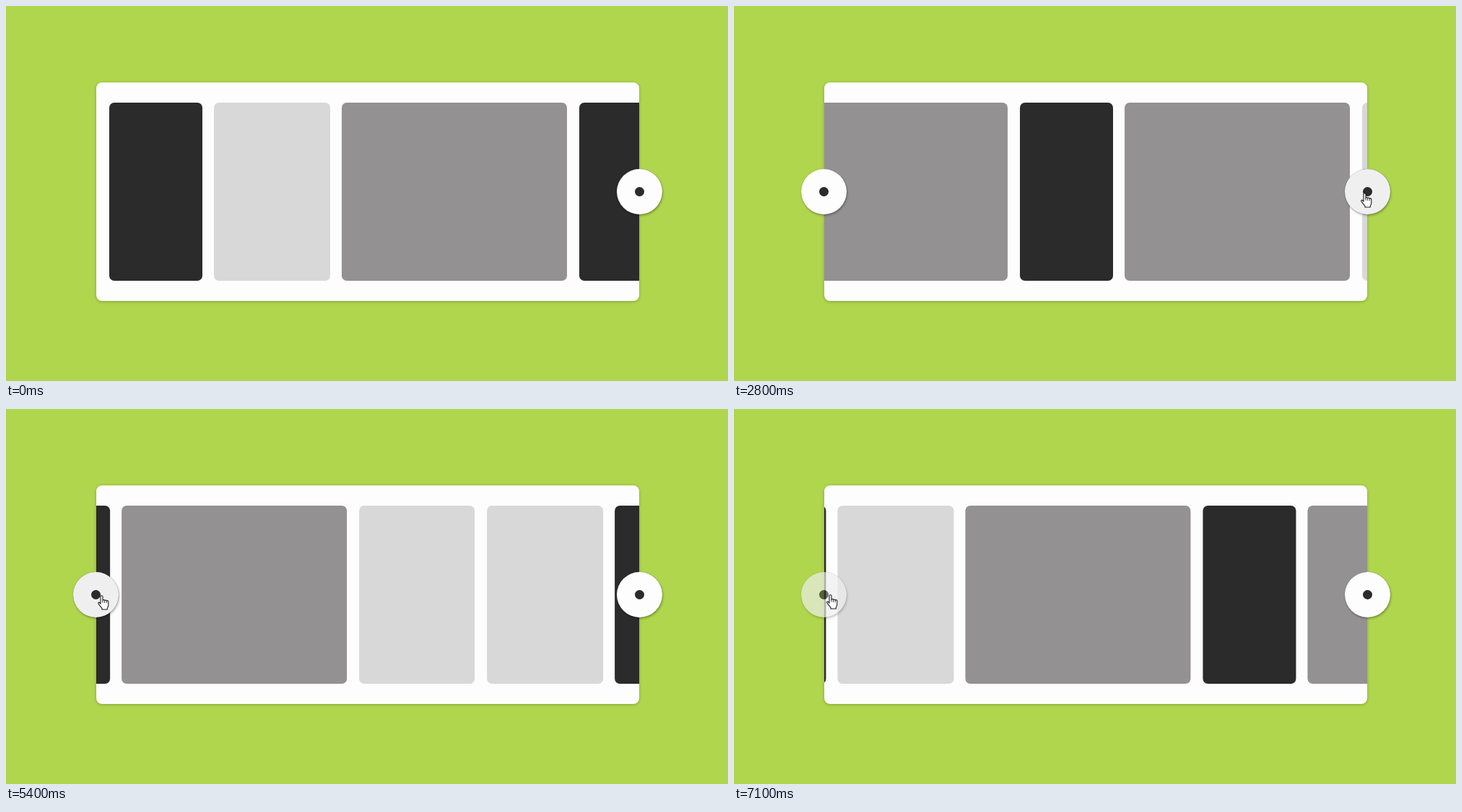
An HTML page for the animation above (7.2 s loop, 1000 by 520 pixels).

```html
<!DOCTYPE html>
<html lang="en">
<head>
<meta charset="utf-8">
<title>Scrolling panel</title>
<style>
  html, body { margin: 0; width: 100%; height: 100%; overflow: hidden; background: #afd64c; }
  .stage { position: relative; width: 1000px; height: 520px; overflow: hidden; }
  .card {
    position: absolute; left: 124.5px; top: 106px; width: 752.5px; height: 303px;
    border-radius: 8px; background: #fefdfe; overflow: hidden;
    box-shadow: 0 1px 4px rgba(0, 0, 0, .24);
  }
  .track { position: absolute; left: 0; top: 28px; height: 247px; }
  .tile { position: absolute; top: 0; height: 247px; border-radius: 7px; }
  .paddle {
    position: absolute; top: 226px; width: 63px; height: 63px; border-radius: 50%;
    box-shadow: 0 0 1px rgba(0, 0, 0, .45), 1px 2px 3px rgba(0, 0, 0, .28);
  }
  .paddle::after {
    content: ""; position: absolute; left: 25px; top: 24.5px;
    width: 13px; height: 13px; border-radius: 50%; background: #2b2b2b;
  }
  #left { left: 93px; }
  #right { left: 845.5px; }
  #hand { position: absolute; left: 0; top: 0; overflow: visible; }
</style>
</head>
<body>
<div class="stage">
  <div class="card"><div class="track" id="track"></div></div>
  <div class="paddle" id="left"></div>
  <div class="paddle" id="right"></div>
  <svg id="hand" width="16" height="21" viewBox="0 0 16 21">
    <path d="M4 2.2a1.5 1.5 0 0 1 3 0V7.2a1.4 1.4 0 0 1 2.6.5 1.4 1.4 0 0 1 2.6.7 1.4 1.4 0 0 1 2.6 1V14
             c0 2-1.3 3.4-1.6 4.6V20H6v-1.4C4.8 16.6 2.4 14.6.9 11.8c-.6-1.6 1-2.2 2-.9L4 12.2Z"
          fill="#fff" stroke="#1c1c1c" stroke-width="1.1" stroke-linejoin="round"/>
    <path d="M7 7v3.6M9.6 8v2.8M12.2 9v2.2" fill="none" stroke="#1c1c1c" stroke-width=".9"/>
  </svg>
</div>
<script>
const LOOP = 7200, TICK = 100, MOVE = 450, GAP = 16.5;
const KINDS = {
  dark: [128.5, '#2b2b2b'],
  light: [160.7, '#d8d8d8'],
  grey: [312.3, '#939192']
};
const ORDER = ['dark', 'light', 'grey', 'dark', 'grey', 'light', 'light', 'dark'];

// Click time and the scroll offset it leads to
const CLICKS = [
  [1458, 199], [2120, 398], [2810, 597], [3480, 874],
  [5180, 675], [5715, 476], [6300, 277], [6880, 0]
];
// Time, x, y of the pointer
const POINTER = [
  [300, 978, 530], [1100, 868, 259], [4350, 868, 259],
  [5050, 127, 258], [5500, 127, 258], [5900, 128, 257]
];

const $ = id => document.getElementById(id);
const [track, left, right, hand] = ['track', 'left', 'right', 'hand'].map($);
const clamp = x => Math.min(1, Math.max(0, x));
const ramp = (t, start, length) => clamp((t - start) / length);
const easeInOut = x => x < .5 ? 2 * x * x : 1 - 2 * (1 - x) ** 2;

let x = 18.5;
for (const kind of ORDER) {
  const [width, color] = KINDS[kind];
  const tile = document.createElement('div');
  tile.className = 'tile';
  Object.assign(tile.style, { left: x + 'px', width: width + 'px', background: color });
  track.append(tile);
  x += width + GAP;
}

function scrollAt(t) {
  let offset = 0;
  for (const [start, goal] of CLICKS) offset += (goal - offset) * easeInOut(ramp(t, start, MOVE));
  return offset;
}

function pointerAt(t) {
  let [, px, py] = POINTER[0];
  for (let i = 1; i < POINTER.length; i++) {
    const start = POINTER[i - 1][0], [end, nx, ny] = POINTER[i];
    const k = easeInOut(ramp(t, start, end - start));
    px += (nx - px) * k;
    py += (ny - py) * k;
  }
  return [px, py];
}

function paint(paddle, opacity, hovered) {
  paddle.style.opacity = opacity;
  paddle.style.background = hovered ? '#f0eff0' : '#fefdfe';
}

function draw(t) {
  track.style.transform = `translateX(${-scrollAt(t)}px)`;
  const [px, py] = pointerAt(t);
  hand.style.transform = `translate(${px}px, ${py}px)`;
  hand.style.visibility = t < 400 ? 'hidden' : 'visible';
  const near = cx => Math.hypot(px + 5 - cx, py - 257.5) < 31.5;
  paint(left, ramp(t, 1430, 200) - ramp(t, 7000, 300), near(124.5));
  paint(right, 1 - ramp(t, 3580, 300) + ramp(t, 5000, 150), near(877));
}

const origin = performance.now();
function frame() {
  const t = (performance.now() - origin) % LOOP;
  draw(Math.floor(t / TICK) * TICK);
  requestAnimationFrame(frame);
}
frame();
</script>
</body>
</html>
```
